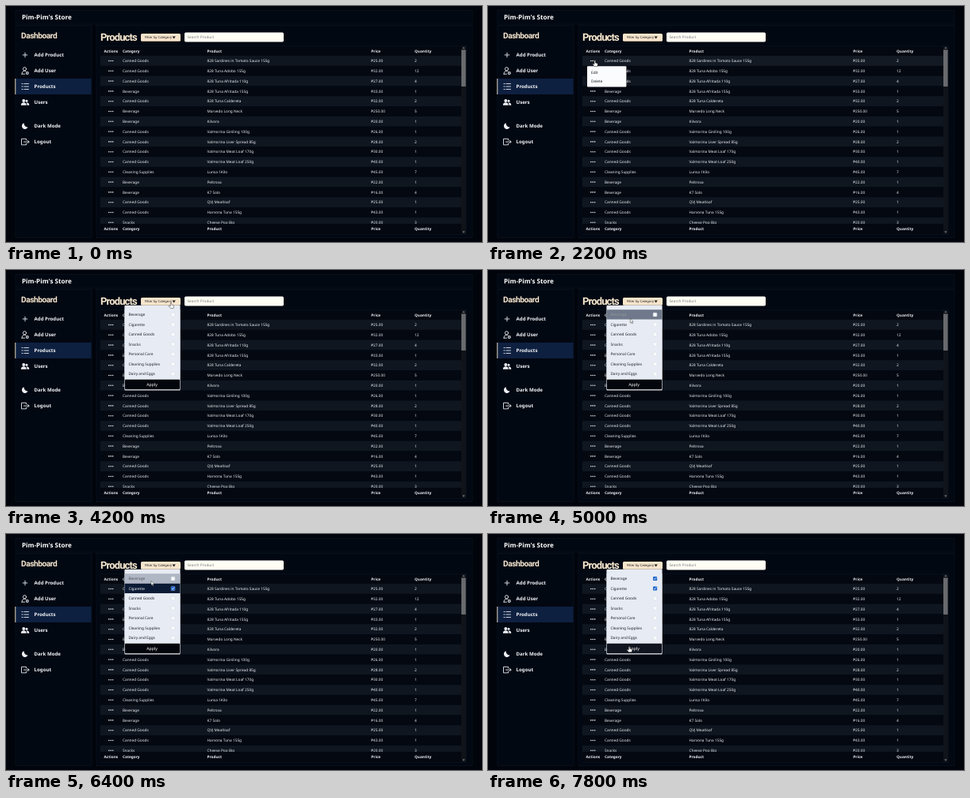
These frames come from a looping animation (600x299 px, 8000 ms). An HTML page:

```html
<!DOCTYPE html>
<html lang="en">
<head>
<meta charset="utf-8">
<title>Store products</title>
<style>
  html, body { margin: 0; width: 100%; height: 100%; overflow: hidden; background: #01040b; }
  svg { display: block; width: 600px; height: 299px; }
  text { font: 500 4.75px "Noto Sans", "Open Sans", sans-serif; fill: #eef0f4; text-rendering: geometricPrecision; white-space: pre; }
  .b { font-weight: 700; }
  .nav { font-size: 6.1px; font-weight: 600; fill: #f3f5f8; }
  .store { font-size: 8.1px; font-weight: 600; fill: #fff; }
  .head { font-family: Roboto, sans-serif; font-weight: 700; fill: #f8e8d0; }
  .panel { fill: #020812; stroke: #0b1422; stroke-width: .7; }
  .ink { fill: #161a22; }
  .line { fill: none; stroke: #e8ebf0; stroke-width: .9; stroke-linecap: round; stroke-linejoin: round; }
  .solid { fill: #eef0f4; }
</style>
</head>
<body>
<svg id="stage" viewBox="0 0 600 299"></svg>
<script>
const LOOP = 8000, STEP = 200, PITCH = 12.8, TOP = 63.1;

const text = (x, y, s, cls = "", more = "") => `<text x="${x}" y="${y}" class="${cls}" ${more}>${s}</text>`;
const rect = (x, y, w, h, fill, more = "") => `<rect x="${x}" y="${y}" width="${w}" height="${h}" fill="${fill}" ${more}/>`;
const path = (d, cls = "line", more = "") => `<path d="${d}" class="${cls}" ${more}/>`;

const kinds = { C: "Canned Goods", B: "Beverage", L: "Cleaning Supplies", S: "Snacks" };
const products = [
  ["C", "828 Sardines in Tomato Sauce 155g", 25, 2],
  ["C", "828 Tuna Adobo 155g", 32, 12],
  ["C", "828 Tuna Afritada 110g", 27, 4],
  ["B", "828 Tuna Afritada 155g", 33, 1],
  ["C", "828 Tuna Caldereta", 32, 2],
  ["B", "Marvedo Long Neck", 250, 5],
  ["B", "Kilvora", 20, 1],
  ["C", "Valmorina Giniling 100g", 26, 1],
  ["C", "Valmorina Liver Spread 85g", 28, 2],
  ["C", "Valmorina Meat Loaf 170g", 30, 1],
  ["C", "Valmorina Meat Loaf 250g", 40, 1],
  ["L", "Lunsa 1Kilo", 45, 7],
  ["B", "Peltrova", 22, 1],
  ["B", "K7 Solo", 16, 4],
  ["C", "QVJ Meatloaf", 25, 1],
  ["C", "Harvona Tuna 155g", 43, 1],
  ["S", "Cheese Pop Big", 20, 3]
];
const columns = [[123.5, "Actions"], [147, "Category"], [253.5, "Product"], [460.3, "Price"], [515, "Quantity"]];
const filters = ["Beverage", "Cigarette", "Canned Goods", "Snacks", "Personal Care", "Cleaning Supplies", "Dairy and Eggs"];

const labels = y => columns.map(([x, s]) => text(x, y, s, "b")).join("");
const stripe = i => i % 2 ? "#030811" : "#10161f";

function row([kind, name, price, count], i) {
  const mid = TOP + (i + .5) * PITCH, y = mid + 1.75;
  const dots = [-2.4, 0, 2.4].map(d => `<circle cx="${132.2 + d}" cy="${mid}" r=".8" fill="#eef0f4"/>`).join("");
  return rect(119, mid - PITCH / 2, 455.5, PITCH, stripe(i), 'class="row"') + dots +
    text(147, y, kinds[kind]) + text(253.5, y, name) +
    text(460.3, y, "₱" + price.toFixed(2)) + text(515, y, count);
}

function sidebar() {
  const items = [["Add Product", 62], ["Add User", 82], ["Products", 102], ["Users", 122], ["Dark Mode", 152], ["Logout", 172]];
  const list = [98.5, 102, 105.5].map(y => `M20 ${y}h1.2M23 ${y}h5.5`).join("");
  return `<rect class="panel" x="12" y="24.5" width="96" height="269"/>` +
    text(19, 41.4, "Dashboard", "head", 'style="font-size:10.2px;letter-spacing:-.45px"') +
    rect(12, 92, 95.5, 20, "#0e2040") + rect(11.3, 92, 1, 20, "#e3d6c0") +
    items.map(([s, y]) => text(35.6, y + 2.25, s, "nav")).join("") +
    path("M24 59.2v5.6M21.2 62h5.6") +
    `<circle class="line" cx="23.5" cy="79.7" r="2.1"/>` + path("M20 86.2c0-4 3-4.2 5-3.6M20 86.2h3.5") +
    `<circle class="solid" cx="26.8" cy="85" r="2"/>` + path("M26.8 84v2M25.8 85h2", "line", 'style="stroke:#020812;stroke-width:.6"') +
    path(list) +
    `<circle class="solid" cx="22.3" cy="120" r="1.9"/><circle class="solid" cx="26" cy="120.2" r="1.5"/>` +
    path("M18.8 125.7c0-4.6 7-4.6 7 0zM26.5 125.7c0-1.4-.3-2.3-1-3 2-.6 3.8.5 3.8 3z", "solid") +
    path("M22.6 148.2a4 4 0 1 0 5 5.4a5 5 0 0 1-5-5.4z", "solid") +
    path("M25.5 170v-1.7h-6v7.6h6v-1.7M22.5 172.1h6.5M27.2 170.2l1.9 1.9l-1.9 1.9");
}

function table() {
  return `<rect class="panel" x="114" y="24.5" width="474" height="269"/>` +
    text(119, 43.8, "Products", "head", 'style="font-size:13px;letter-spacing:-.85px"') +
    rect(170, 35, 50, 9.7, "#f8e5cb", 'rx="1.5"') +
    text(175, 41.4, "Filter by Category", "ink", 'style="font-size:4.15px"') +
    path("M209.6 38.5h4.2l-2.1 3.1z", "ink") +
    rect(225, 33.5, 125, 12, "#fffef4", 'rx="1.8"') +
    text(228.5, 41.2, "Search Product", "", 'style="fill:#7b7d80"') +
    rect(119, 50.3, 461, 239, "#030811", 'stroke="#0d1521" stroke-width=".6"') +
    labels(58.7) + products.map(row).join("") +
    rect(119, 275.9, 455.5, 13.1, "#030811") + labels(284.4) +
    rect(574, 50.5, 5.9, 238.5, "#10141a") + rect(574, 55.5, 5.6, 46.5, "#686a6d") +
    path("M575.4 53.8l1.5-1.8 1.5 1.8zM575.4 285.6l1.5 1.8 1.5-1.8z", "", 'fill="#8a8c90"');
}

const actionMenu = rect(125, 76.2, 49.4, 26.2, "#fbfcfd", 'rx="1"') +
  text(130, 86.3, "Edit", "ink") + text(130, 96.9, "Delete", "ink");

const filterMenu = rect(149.4, 44.8, 70.2, 107.8, "#e7ebf3", 'rx="1"') +
  filters.map((s, i) => {
    const mid = 56.5 + i * 12.5;
    return `<g class="option">${rect(149.6, mid - 6.25, 69.8, 12.5, "#e7ebf3")}${text(154.4, mid + 1.75, s)}` +
      rect(208.2, mid - 2.3, 4.7, 4.7, "#f8fafc", 'rx=".8" stroke="#d2d8e2" stroke-width=".5"') +
      `<g class="tick">${rect(208, mid - 2.5, 5.1, 5.1, "#1b62c9", 'rx=".8"')}` +
      path(`M209.2 ${mid + .1}l1 1.1l1.8-2.3`, "line", 'style="stroke:#fff;stroke-width:.8"') + `</g></g>`;
  }).join("") +
  rect(150, 138.8, 69, 12.4, "#03060c", 'id="apply" rx="1"') +
  text(184, 146.9, "Apply", "", 'text-anchor="middle" style="font-size:5.2px;fill:#fff"');

const pointer = `<g id="cursor" fill="#fff" stroke="#111" stroke-width=".4">` +
  path("M0 0v5.6l1.3-1.2.9 2 .9-.4-.9-1.9h1.7z", "", 'id="arrow"') +
  path("M-.7 .5q.7-1 1.4 0v2.3l2.3.6q.7.3.6 1.2l-.5 2.6h-3.7l-2.2-2.7q.2-1 1.1-.5l1 .8z", "", 'id="hand"') + `</g>`;

const $ = id => document.getElementById(id);
$("stage").innerHTML = rect(0, 0, 600, 299, "#01040b") +
  `<rect class="panel" x="12" y="5.5" width="576" height="17.5"/>` + text(20, 17.2, "Pim-Pim's Store", "store") +
  sidebar() + table() + `<g id="actions">${actionMenu}</g><g id="filter">${filterMenu}</g>` + pointer;

// Cursor path: [time, x, y]
const route = [
  [200, 226, 158], [400, 214, 140], [800, 188, 106], [1200, 156, 75], [1600, 134.7, 69.3],
  [2400, 134.7, 69.3], [2800, 150, 62], [3400, 204, 44], [3600, 208, 41.3], [4400, 208, 41.3],
  [4800, 190, 48], [5000, 179.3, 61.5], [5200, 179, 62], [5400, 180, 68.5], [6200, 181, 68],
  [6400, 183, 59.5], [7200, 182, 59], [7400, 181, 82], [7600, 179, 120], [7800, 178, 142.5]
];
const hands = [[1600, 2600], [3400, 4800], [7800, 8000]];
// Hover strength of each option: [start, end, option, amount]
const hovers = [
  [5000, 5200, 0, .55], [5200, 5400, 0, 1], [5400, 5600, 0, .5], [5400, 5600, 1, .5], [5600, 6600, 1, 1],
  [6400, 6600, 0, .25], [6600, 7400, 0, 1], [7400, 7600, 0, .5], [7400, 7600, 2, .5], [7600, 7800, 5, .5]
];
const ticks = [6800, 5800];

const within = (t, [a, b]) => t >= a && t < b;
const show = (el, on) => el.style.display = on ? "" : "none";
const mix = (a, b, k) => `rgb(${a.map((v, i) => Math.round(v + (b[i] - v) * k))})`;

function place(t) {
  const i = route.findIndex(p => p[0] >= t);
  if (i <= 0) return route[0].slice(1);
  const [a, b] = [route[i - 1], route[i]], k = (t - a[0]) / (b[0] - a[0]);
  return [1, 2].map(n => a[n] + (b[n] - a[n]) * k);
}

const rows = [...document.querySelectorAll(".row")];
const options = [...document.querySelectorAll(".option")];

function draw(t) {
  const [x, y] = place(t), live = t >= 200, open = t >= 3800;
  show($("cursor"), live);
  $("cursor").setAttribute("transform", `translate(${x} ${y})`);
  const hand = hands.some(h => within(t, h));
  show($("hand"), hand);
  show($("arrow"), !hand);
  show($("actions"), within(t, [2200, 2800]));
  show($("filter"), open);
  const over = live && !open ? Math.floor((y - TOP) / PITCH) : -1;
  rows.forEach((el, i) => el.style.fill = i === over ? "#141a23" : stripe(i));
  options.forEach((el, i) => {
    const hit = hovers.find(h => h[2] === i && within(t, h));
    const k = hit ? hit[3] : 0;
    el.querySelector("rect").style.fill = mix([231, 235, 243], [12, 27, 53], k);
    el.querySelector("text").style.fill = mix([28, 33, 42], [245, 247, 250], k);
    show(el.querySelector(".tick"), t >= (ticks[i] || LOOP));
  });
  $("apply").style.fill = t >= 7800 ? "#10151f" : "#03060c";
}

const start = performance.now();
function tick() {
  const t = (performance.now() - start) % LOOP;
  draw(Math.floor(t / STEP) * STEP);
  requestAnimationFrame(tick);
}
tick();
</script>
</body>
</html>
```
